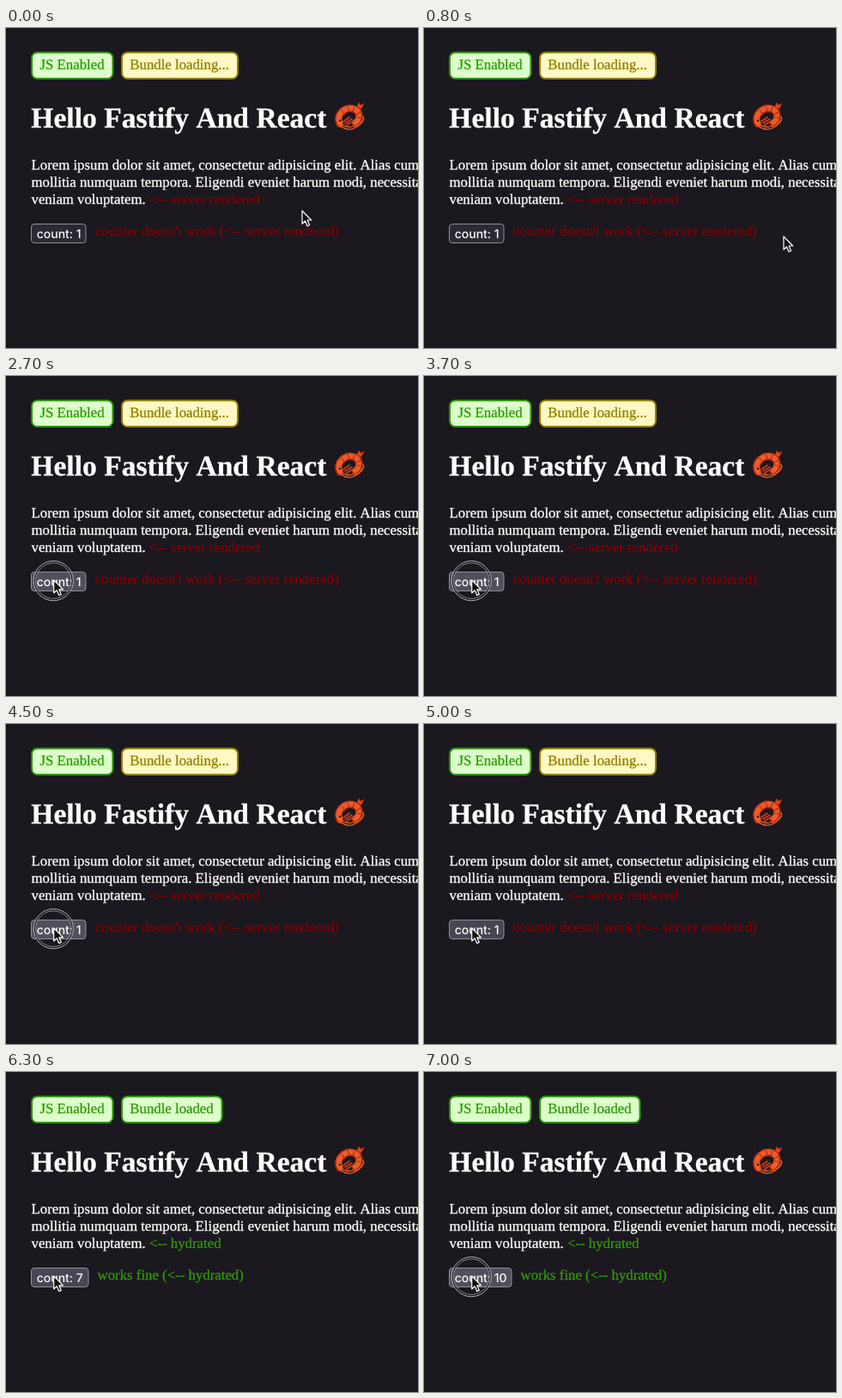
An HTML page that plays this animation: 480 px wide and 373 px high, repeating every 7.1 s.

```html
<!DOCTYPE html>
<html lang="en">
<head>
<meta charset="utf-8">
<title>Hydration demo</title>
<style>
  html, body { margin: 0; width: 100%; height: 100%; overflow: hidden; background: #1b181f; }
  svg { display: block; width: 480px; height: 373px; }
  text {
    font: 16.8px "Liberation Serif", "Times New Roman", serif;
    font-kerning: none;
    white-space: pre;
    text-rendering: geometricPrecision;
    color: #fff;
    fill: currentColor;
    stroke: currentColor;
    stroke-width: .3;
  }
  tspan { fill: currentColor; stroke: currentColor; }
  .title { font-size: 33.6px; font-weight: bold; }
  .badge rect { stroke-width: 2; }
  .ok rect { fill: #dcffcb; stroke: #2b9404; }
  .ok text, text.ok, tspan.ok { color: #2f9a07; }
  .wait rect { fill: #fff8c5; stroke: #908000; }
  .wait text { color: #908000; }
  text.bad, tspan.bad { color: #850205; }
  #button rect { stroke: #8f8f9d; }
  #button text { font: 500 14px Inter, sans-serif; color: #fbfbfe; stroke: none; }
</style>
</head>
<body>
<svg viewBox="0 0 480 373">
  <g class="badge ok">
    <rect x="30" y="28.4" width="94.5" height="30.6" rx="6.5"/>
    <text x="39.5" y="47.8">JS Enabled</text>
  </g>
  <g id="bundle">
    <rect x="135" y="28.4" height="30.6" rx="6.5"/>
    <text x="144.3" y="47.8"></text>
  </g>

  <text class="title" x="29.3" y="115.8">Hello Fastify And React</text>
  <g id="shrimp" fill="none" stroke-linecap="round" stroke-linejoin="round">
    <path d="M389 112C383 101 395 92 404 94C413 96 414 107 407 111" stroke="#b32a12" stroke-width="8.5"/>
    <path d="M389 111C384 101 395 92 404 93.5C412 95 413 106 407 110" stroke="#ec5c29" stroke-width="6"/>
    <path d="M391 96l4 5M398 91l2 6M406 92l-2 6M413 98l-5 3M414 105l-5-1" stroke="#b32a12" stroke-width="1.2"/>
    <path d="M409 92L411 87L413 90L417 88L414 94Z" fill="#dc4a1e" stroke="#b32a12"/>
    <path d="M393 109l7-5M395 111l8-5M397 113l8-5" stroke="#cf3f19" stroke-width="1.6"/>
    <path d="M388 113Q399 122 409 115T416 103M387 110Q397 118 407 114" stroke="#ed642b" stroke-width="1.3"/>
    <circle cx="389" cy="108" r="1.2" fill="#21110f"/>
  </g>

  <text x="29.5" y="165">Lorem ipsum dolor sit amet, consectetur adipisicing elit. Alias cumque</text>
  <text x="29.5" y="185">mollitia numquam tempora. Eligendi eveniet harum modi, necessitatibus</text>
  <text x="29.5" y="205.2">veniam voluptatem. <tspan id="origin"></tspan></text>

  <g id="button">
    <rect x="29.5" y="228.5" height="22" rx="3.5"/>
    <text x="35.7" y="245"></text>
  </g>
  <text id="note" y="242.1"></text>

  <g id="ring" fill="none">
    <circle cx="55.3" cy="238.7" r="22" stroke="#17151b" stroke-opacity=".75" stroke-width="2"/>
    <circle cx="55.3" cy="238.7" r="23.1" stroke="#b5b4ba"/>
    <circle cx="55.3" cy="238.7" r="20.8" stroke="#a3a2a9" stroke-width=".8"/>
  </g>
  <path id="cursor" d="M0 0V15.2L3.5 12L6 17.8L8.6 16.7L6.1 11H10.8Z" fill="#111" stroke="#fff" stroke-width="1.2" stroke-linejoin="round"/>
</svg>
<script>
const LOOP = 7100, STEP = 100, LOADED = 5100, FIRST_CLICK = 1800;
const path = [
  [0, 345, 213],
  [400, 398, 269],
  [800, 419, 243],
  [1500, 55.7, 237.8]
];

const $ = id => document.getElementById(id);
const [bundle, button] = ["bundle", "button"].map(id => {
  const g = $(id);
  return { g, rect: g.querySelector("rect"), text: g.querySelector("text") };
});
const ease = u => u * u * (3 - 2 * u);

function cursorAt(t) {
  const k = path.findIndex(p => p[0] > t);
  if (k < 0) return path[path.length - 1].slice(1);
  const [a, b] = [path[k - 1], path[k]];
  const u = ease((t - a[0]) / (b[0] - a[0]));
  return [a[1] + (b[1] - a[1]) * u, a[2] + (b[2] - a[2]) * u];
}

function isPressed(t) {
  if (t < FIRST_CLICK) return false;
  return t < LOADED ? (t - FIRST_CLICK) % 300 < 200 : t % 200 < 100;
}

function draw(t) {
  const loaded = t >= LOADED;
  const pressed = isPressed(t);
  const count = loaded ? 1 + Math.floor((t - LOADED) / 200) : 1;
  const width = count > 9 ? 72.5 : count > 1 ? 66.5 : 63.5;
  const [x, y] = cursorAt(t);
  const hover = x < 93 && y > 228 && y < 251;

  bundle.g.setAttribute("class", loaded ? "badge ok" : "badge wait");
  bundle.rect.setAttribute("width", loaded ? 116.6 : 135);
  bundle.text.textContent = loaded ? "Bundle loaded" : "Bundle loading...";

  $("origin").setAttribute("class", loaded ? "ok" : "bad");
  $("origin").textContent = loaded ? "<-- hydrated" : "<-- server rendered";

  button.rect.setAttribute("width", width);
  button.rect.setAttribute("fill", pressed ? "#514f5c" : hover ? "#484652" : "#2b2a33");
  button.text.textContent = "count: " + count;

  $("note").setAttribute("class", loaded ? "ok" : "bad");
  $("note").setAttribute("x", 29.5 + width + 10.6);
  $("note").textContent = loaded ? "works fine (<-- hydrated)" : "counter doesn't work (<-- server rendered)";

  $("ring").setAttribute("visibility", pressed ? "visible" : "hidden");
  $("cursor").setAttribute("transform", `translate(${x} ${y})`);
}

const start = performance.now();
function tick() {
  const t = (performance.now() - start) % LOOP;
  draw(Math.floor(t / STEP) * STEP);
  requestAnimationFrame(tick);
}
tick();
</script>
</body>
</html>
```
